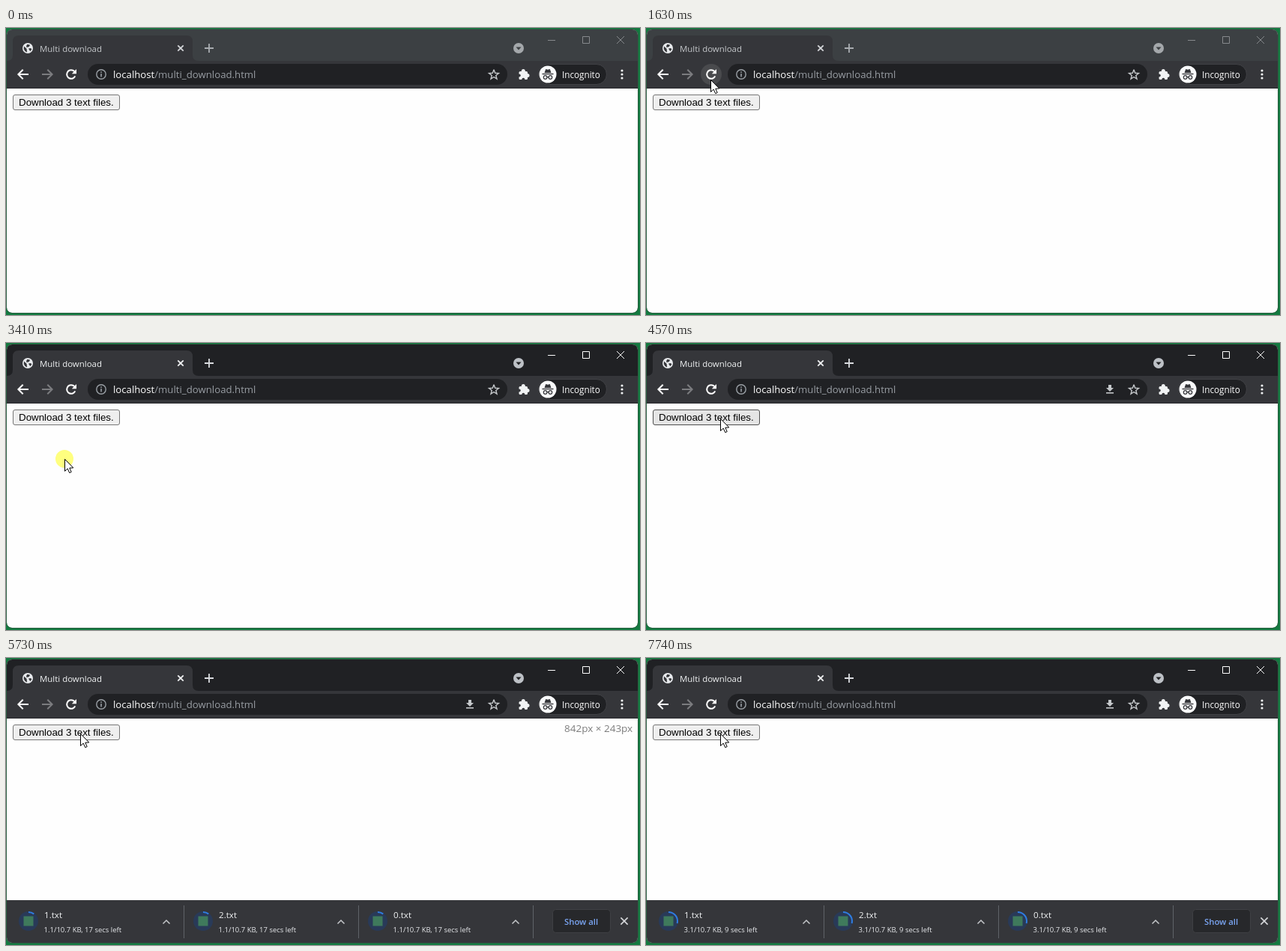
An HTML page with a canvas for the animation above (8 s loop, 846 px wide and 384 px high).

```html
<!DOCTYPE html>
<html lang="en">
<head>
<meta charset="utf-8">
<title>Multi download</title>
<style>
html, body { margin: 0; width: 100%; height: 100%; overflow: hidden; background: #137a40; }
canvas { display: block; }
</style>
</head>
<body>
<canvas id="stage" width="846" height="384"></canvas>
<script>
const ctx = document.getElementById('stage').getContext('2d');
const LOOP = 8000;
const UI = '"Open Sans", "Noto Sans", sans-serif';
const PAGE = '"Liberation Sans", Arial, sans-serif';
const RAD = Math.PI / 180;

// Cursor moves: start, number of steps, from, to
const MOVES = [
  { at: 530, steps: 3, from: [303, 294], to: [198, 165], enter: true },
  { at: 850, steps: 11, from: [198, 165], to: [86, 69] },
  { at: 2550, steps: 7, from: [86, 69], to: [78, 155] },
  { at: 3560, steps: 7, from: [78, 155], to: [99, 101] }
];
const STEP = 77;
const CLICKS = [[1700, 1850], [3410, 3560], [4490, 4570]];
// Download updates: time, KB received, seconds left
const UPDATES = [[5270, 0.6, 17], [5730, 1.1, 17], [6270, 1.6, 11], [6730, 2.1, 11], [7280, 2.6, 9], [7740, 3.1, 9]];
const TOTAL = 10.7;

const between = (t, a, b) => t >= a && t < b;
const ease = u => u * u * (3 - 2 * u);

function box(x, y, w, h, r, fill, stroke) {
  ctx.beginPath();
  ctx.roundRect(x, y, w, h, r);
  if (fill) { ctx.fillStyle = fill; ctx.fill(); }
  if (stroke) { ctx.strokeStyle = stroke; ctx.lineWidth = 1; ctx.stroke(); }
}

function disc(x, y, r, fill) {
  ctx.beginPath();
  ctx.arc(x, y, r, 0, 2 * Math.PI);
  ctx.fillStyle = fill;
  ctx.fill();
}

function arc(x, y, r, a, b, color, width) {
  ctx.beginPath();
  ctx.arc(x, y, r, a * RAD, b * RAD);
  ctx.strokeStyle = color;
  ctx.lineWidth = width;
  ctx.stroke();
}

function trace(pts) {
  ctx.beginPath();
  pts.forEach(([x, y], i) => i ? ctx.lineTo(x, y) : ctx.moveTo(x, y));
}

function line(color, width, ...pts) {
  trace(pts);
  ctx.strokeStyle = color;
  ctx.lineWidth = width;
  ctx.stroke();
}

function poly(color, ...pts) {
  trace(pts);
  ctx.closePath();
  ctx.fillStyle = color;
  ctx.fill();
}

function cross(x, y, r, color, width) {
  line(color, width, [x - r, y - r], [x + r, y + r]);
  line(color, width, [x + r, y - r], [x - r, y + r]);
}

function text(str, x, y, size, color, family = UI, weight = 400) {
  ctx.font = `${weight} ${size}px ${family}`;
  ctx.fillStyle = color;
  ctx.fillText(str, x, y);
  return ctx.measureText(str).width;
}

function cursorAt(t) {
  let pos = null;
  for (const m of MOVES) {
    if (t < m.at) break;
    const i = Math.min(m.steps - 1, Math.floor((t - m.at) / STEP));
    const u = ease(m.enter ? i / (m.steps - 1) : (i + 1) / m.steps);
    pos = m.from.map((v, k) => Math.round(v + (m.to[k] - v) * u));
  }
  return pos;
}

function globe(x, y, tab, color) {
  disc(x, y, 7, color);
  poly(tab, [x - 5, y - 2.5], [x - 1.5, y + .8], [x - .8, y + 5.4], [x - 3.6, y + 4], [x - 5.3, y + 1]);
  poly(tab, [x - .5, y - 5.3], [x + 3.2, y - 4.2], [x + 1.5, y - 1.8], [x - 1.6, y - 1], [x - 1.8, y - 3.2]);
  poly(tab, [x + 1, y + .4], [x + 4, y], [x + 5.3, y + 1.2], [x + 3.5, y + 4.2], [x + 2, y + 2.2]);
}

function titleBar(t) {
  const active = t >= 1700;
  const bar = active ? '#202124' : '#3c4043';
  const tab = '#35363a';
  const ink = active ? '#ffffff' : '#86898c';
  const label = active ? '#f1f3f4' : '#c4c7ca';
  ctx.fillStyle = bar;
  ctx.fillRect(1, 2, 842, 43);

  ctx.beginPath();
  ctx.moveTo(1, 44);
  ctx.quadraticCurveTo(9, 44, 9, 36);
  ctx.lineTo(9, 18);
  ctx.quadraticCurveTo(9, 10, 17, 10);
  ctx.lineTo(241, 10);
  ctx.quadraticCurveTo(249, 10, 249, 18);
  ctx.lineTo(249, 36);
  ctx.quadraticCurveTo(249, 44, 257, 44);
  ctx.fillStyle = tab;
  ctx.fill();

  if (between(t, 1850, 2550)) {
    const turn = Math.floor((t - 2240) / STEP) * STEP * .36;
    arc(29, 27, 7, turn - 95, turn + 125, '#5f93e8', 2);
  } else {
    globe(29, 27, tab, '#e8eaed');
  }
  text('Multi download', 45, 32, 11.45, label);
  cross(233, 27, 3.7, active ? '#f1f3f4' : '#d5d7da', 1.8);
  const plus = active ? '#dadce0' : '#a9adb1';
  line(plus, 1.8, [265, 27], [277, 27]);
  line(plus, 1.8, [271, 21], [271, 33]);
  disc(684, 27, 7, active ? '#bdc1c6' : '#a4a8ab');
  poly(bar, [680.5, 25.5], [687.5, 25.5], [684, 29.5]);

  line(ink, 1, [723, 16.5], [733, 16.5]);
  box(769.5, 11.5, 9, 9, 0, null, ink);
  cross(820, 16, 5, ink, 1);
}

function reload(x, y) {
  arc(x, y, 5.8, 25, 318, '#ffffff', 2);
  poly('#ffffff', [x + 7, y - 7], [x + 7, y - .8], [x + .8, y - .8]);
}

function arrow(x, y, dir, color) {
  line(color, 2, [x - 7 * dir, y], [x + 6 * dir, y]);
  line(color, 2, [x + .3 * dir, y - 6.3], [x + 6.6 * dir, y], [x + .3 * dir, y + 6.3]);
}

function star(x, y) {
  const pts = [];
  for (let i = 0; i < 11; i++) {
    const r = i % 2 ? 2.9 : 6.8, a = (i * 36 - 90) * RAD;
    pts.push([x + r * Math.cos(a), y + .6 + r * Math.sin(a)]);
  }
  line('#c4c7ca', 1.4, ...pts);
}

function puzzle(x, y) {
  box(x - 6.5, y - 4, 11.5, 11, 1.5, '#f1f3f4');
  disc(x - .7, y - 4.5, 2.5, '#f1f3f4');
  disc(x + 5, y + 1.5, 2.5, '#f1f3f4');
  disc(x - 6.3, y + 1.5, 2, '#35363a');
  disc(x - .7, y + 6.8, 2, '#35363a');
}

function hatGlasses(x, y) {
  const c = '#35363a';
  disc(x, y, 11.5, '#f8f9fa');
  poly(c, [x - 4.5, y - 2], [x - 2.8, y - 7], [x, y - 6.2], [x + 2.8, y - 7], [x + 4.5, y - 2]);
  ctx.fillStyle = c;
  ctx.fillRect(x - 7.5, y - 1.2, 15, 1.4);
  arc(x - 3.4, y + 4, 2.3, 0, 360, c, 1.2);
  arc(x + 3.4, y + 4, 2.3, 0, 360, c, 1.2);
  line(c, 1.1, [x - 1.2, y + 3.6], [x + 1.2, y + 3.6]);
}

function toolbar(t, pos) {
  ctx.fillStyle = '#35363a';
  ctx.fillRect(1, 44, 842, 37);
  ctx.fillStyle = '#292a2d';
  ctx.fillRect(1, 80, 842, 1);
  arrow(23, 62, -1, '#ffffff');
  arrow(55, 62, 1, '#7b7c7f');
  if (pos && Math.hypot(pos[0] - 87, pos[1] - 62) < 14) disc(87, 62, 14, '#494a4d');
  reload(87, 62);

  box(109, 48, 560, 28, 14, '#202124');
  arc(127, 62, 6.2, 0, 360, '#9aa0a6', 1.4);
  ctx.fillStyle = '#9aa0a6';
  ctx.fillRect(126.2, 61, 1.6, 4.4);
  ctx.fillRect(126.2, 58.3, 1.6, 1.6);
  const w = text('localhost', 143, 67, 13.2, '#ffffff');
  text('/multi_download.html', 143 + w, 67, 13.2, '#999ea4');

  if (t >= 4570) {
    const c = '#c4c7ca';
    ctx.fillStyle = c;
    ctx.fillRect(617, 56, 4, 5);
    ctx.fillRect(614, 66, 10, 1.6);
    poly(c, [614, 60], [624, 60], [619, 65]);
  }
  star(651, 62);
  puzzle(691, 62);
  box(710.5, 48.5, 91, 27, 13.5, '#202124', '#414246');
  hatGlasses(723, 62);
  text('Incognito', 742, 67, 11.7, '#ffffff', UI, 500);
  for (const y of [57, 62, 67]) disc(822, y, 1.6, '#f1f3f4');
}

function pageButton(t, pos) {
  const over = pos && pos[0] >= 9 && pos[0] < 152 && pos[1] >= 89 && pos[1] < 110;
  let fill = '#efefef', edge = '#767676';
  if (between(t, 4490, 4570)) { fill = '#f5f5f5'; edge = '#8d8d8d'; }
  else if (over && t < 4800) { fill = '#e5e5e5'; edge = '#4f4f4f'; }
  box(9.5, 89.5, 142, 20, 2.5, fill, edge);
  text('Download 3 text files.', 17, 104, 13.333, '#000000', PAGE);
}

function shelfItem(x, name, state) {
  disc(x + 29, 352, 13, '#293a58');
  if (state) arc(x + 29, 352, 12, -90, -90 + 360 * state[1] / TOTAL, '#2f7de1', 2);
  box(x + 22.5, 345.5, 13, 13, 0, '#3f7a5c');
  text(name, x + 50, 348, 11.6, '#f1f3f4');
  const status = state ? `${state[1].toFixed(1)}/${TOTAL} KB, ${state[2]} secs left` : 'Starting…';
  text(status, x + 49.5, 367, 9.5, '#e8eaed');
  line('#c4c7ca', 1.5, [x + 208.5, 355.5], [x + 213, 351], [x + 217.5, 355.5]);
  line('#5f6368', 1, [x + 236.5, 331], [x + 236.5, 375]);
}

function shelf(t) {
  ctx.fillStyle = '#35363a';
  ctx.fillRect(1, 324, 842, 57);
  const state = UPDATES.filter(u => t >= u[0]).pop();
  ['1.txt', '2.txt', '0.txt'].forEach((name, i) => shelfItem(1 + 233 * i, name, state));
  box(729.5, 336.5, 77, 31, 4, '#27282b', '#3f4044');
  text('Show all', 745, 357, 11.3, '#7ba6f5', UI, 600);
  cross(825, 352, 4.6, '#d5d7da', 1.6);
  if (t < 5810) text('842px × 243px', 745, 99, 13.5, '#7c7c7c');
}

function pointer(x, y) {
  ctx.save();
  ctx.translate(x + .5, y + .5);
  trace([[0, 0], [0, 16], [3.7, 12.6], [6.2, 18.2], [8.7, 17.1], [6.3, 11.7], [11.3, 11.5]]);
  ctx.closePath();
  ctx.fillStyle = '#ffffff';
  ctx.fill();
  ctx.strokeStyle = '#000000';
  ctx.lineWidth = 1;
  ctx.stroke();
  ctx.restore();
}

function draw(t) {
  const pos = cursorAt(t);
  ctx.fillStyle = '#137a40';
  ctx.fillRect(0, 0, 846, 384);
  ctx.save();
  ctx.beginPath();
  ctx.roundRect(1, 2, 842, 379, 7);
  ctx.clip();
  ctx.fillStyle = '#fefefe';
  ctx.fillRect(1, 2, 842, 379);
  titleBar(t);
  toolbar(t, pos);
  pageButton(t, pos);
  if (t >= 4800) shelf(t);
  ctx.restore();
  box(.5, 1.5, 843, 380, 7.5, null, '#2b6142');
  if (pos) {
    if (CLICKS.some(([a, b]) => between(t, a, b))) disc(pos[0], pos[1], 12, 'rgba(255,255,0,.5)');
    pointer(...pos);
  }
}

const start = performance.now();
function tick() {
  draw((performance.now() - start) % LOOP);
  requestAnimationFrame(tick);
}
tick();
</script>
</body>
</html>
```
